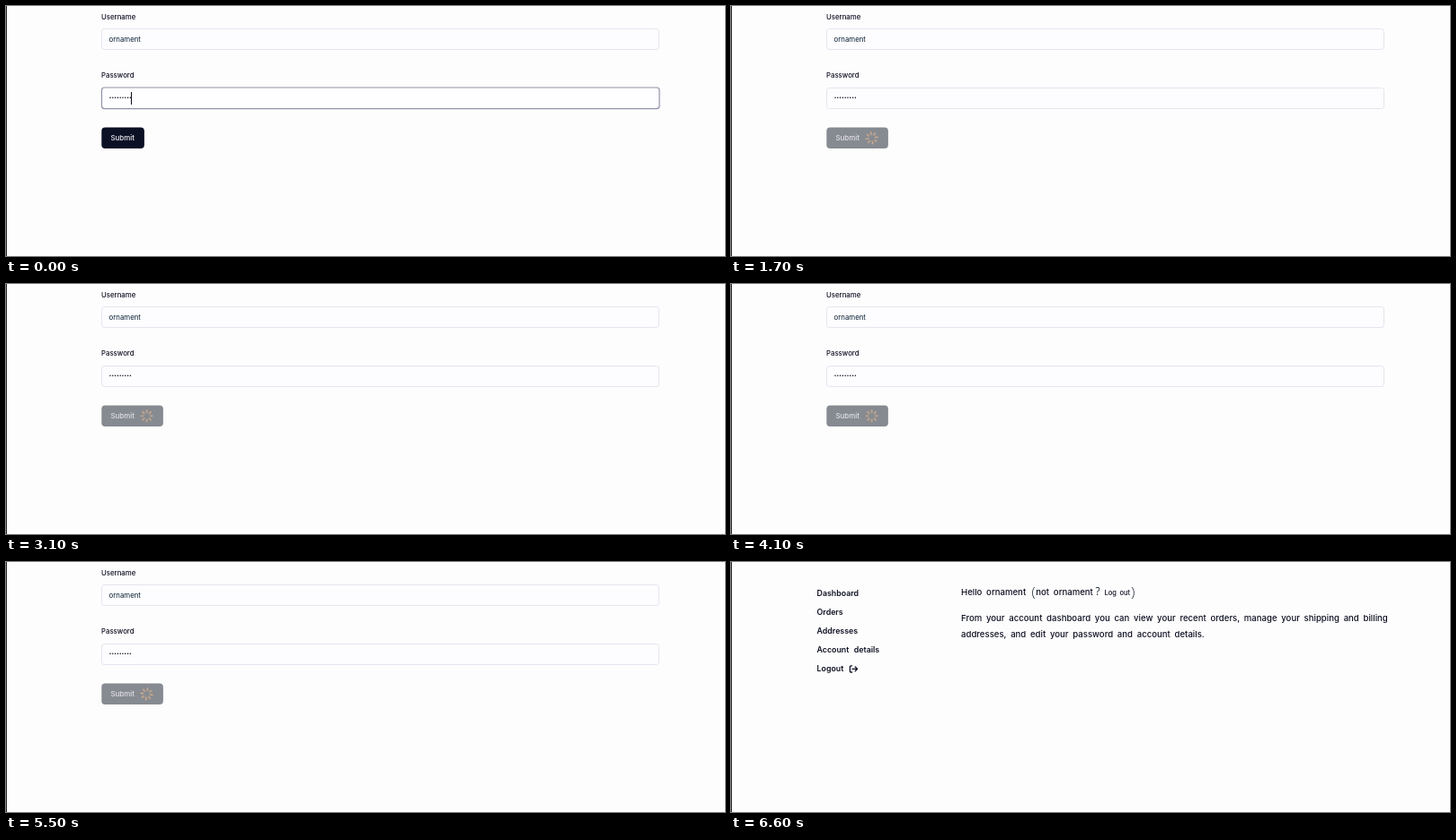
These frames come from a looping animation (800 by 279 pixels, 9000 ms). An HTML page:

```html
<!DOCTYPE html>
<html lang="en">
<head>
<meta charset="utf-8">
<title>Account login</title>
<style>
  html, body { margin: 0; width: 100%; height: 100%; overflow: hidden; background: #fefdfe; }
  svg { display: block; width: 800px; height: 279px; }
  text { font: 500 7.8px Inter, sans-serif; fill: #0d1020; }

  /* Scenes share one 9 s clock with hard cuts. */
  .idle, .caret, .busy, .account { animation: 9s step-end infinite; visibility: hidden; }
  .login { animation: login 9s step-end infinite; }
  .idle { animation-name: idle; }
  .caret { animation-name: caret; }
  .busy { animation-name: busy; }
  .account { animation-name: account; }
  @keyframes login { 0% { visibility: visible } 73.3333%, 100% { visibility: hidden } }
  @keyframes idle { 0% { visibility: visible } 6.6667%, 100% { visibility: hidden } }
  @keyframes caret { 0% { visibility: visible } 4.4444%, 100% { visibility: hidden } }
  @keyframes busy { 0% { visibility: hidden } 6.6667% { visibility: visible } 73.3333%, 100% { visibility: hidden } }
  @keyframes account { 0% { visibility: hidden } 73.3333%, 100% { visibility: visible } }

  .field { fill: #fdfdff; stroke: #e3e5ee; }
  .focus { fill: #fefdff; stroke: #8f93a8; stroke-width: 1.2; }
  .dots { stroke: #0d1020; stroke-width: 1.6; stroke-linecap: round; stroke-dasharray: 0 2.8; }
  .value { font-weight: 400; fill: #0b2033; }
  .button { fill: #0b1024; }
  .button + text { fill: #f1f2f6; font-size: 7.9px; }
  .busy .button { animation: dim 9s step-end infinite; }
  .busy .button + text { fill: #e2e3e6; }
  @keyframes dim { 0% { fill: #92949c } 14.4444%, 100% { fill: #868a91 } }

  .spinner { fill: none; stroke: #dfb48c; stroke-width: 2; stroke-linecap: round;
    animation: spin 1s steps(10) -.4s infinite; }
  @keyframes spin { to { transform: rotate(360deg) } }

  .nav text { font-weight: 600; font-size: 8.8px; word-spacing: 3.3px; }
  .copy text { font-size: 9.6px; word-spacing: 2.15px; }
  .copy .mark { font: 300 15px "Open Sans", sans-serif; fill: #1d2b33; }
  .copy .query { font: 400 12px "Open Sans", sans-serif; fill: #1d2b33; }
  .copy .link { font-size: 7.5px; word-spacing: 1.5px; }
  .icon { fill: none; stroke: #0d1020; stroke-width: 1.3; stroke-linecap: round; stroke-linejoin: round; }
</style>
</head>
<body>
<svg viewBox="0 0 800 279">
  <rect width="800" height="279" fill="#fefdfe"/>

  <g class="login">
    <text x="106" y="14.8">Username</text>
    <rect class="field" x="106.5" y="25.5" width="620" height="23" rx="3"/>
    <text class="value" x="114.6" y="39.7">ornament</text>
    <text x="106" y="80.4">Password</text>
    <rect class="field" x="106.5" y="91.5" width="620" height="23" rx="3"/>
    <rect class="focus idle" x="106.5" y="91" width="620.5" height="23.6" rx="3"/>
    <path class="dots" d="M116 102.3h22.5"/>
    <path class="caret" d="M139.5 96v14" stroke="#0d1020"/>
  </g>

  <g class="idle">
    <rect class="button" x="106.3" y="135.5" width="47.6" height="23.6" rx="4"/>
    <text x="116.5" y="149.8">Submit</text>
  </g>

  <g class="busy">
    <rect class="button" x="106.3" y="135.5" width="68.6" height="23.6" rx="4"/>
    <text x="116.5" y="149.8">Submit</text>
    <g transform="translate(156.6 147.3) scale(.65)">
      <path class="spinner" d="M0-10v4M4.2-4.2l2.9-2.9M6 0h4M4.2 4.2l2.9 2.9M0 6v4M-7.1 7.1l2.9-2.9M-10 0h4M-7.1-7.1l2.9 2.9"/>
    </g>
  </g>

  <g class="account">
    <g class="nav">
      <text x="95.6" y="38.2">Dashboard</text>
      <text x="95.6" y="59.3">Orders</text>
      <text x="95.6" y="80.3">Addresses</text>
      <text x="95.6" y="101.4">Account details</text>
      <text x="95.6" y="122.4">Logout</text>
      <path class="icon" d="M134.6 115.8h-1.2q-1 0-1 1v5.2q0 1 1 1h1.2M135 119.4h5.6M138.2 117l2.4 2.4-2.4 2.4"/>
    </g>
    <g class="copy">
      <text x="256" y="37">Hello ornament</text>
      <text class="mark" x="334.6" y="39">(</text>
      <text x="339.3" y="37">not ornament</text>
      <text class="query" x="405.5" y="37">?</text>
      <text class="link" x="415.5" y="37">Log out</text>
      <text class="mark" x="445.2" y="39">)</text>
      <text x="256" y="65.8">From your account dashboard you can view your recent orders, manage your shipping and billing</text>
      <text x="256" y="84.3">addresses, and edit your password and account details.</text>
    </g>
  </g>

  <rect width="1" height="279" fill="#25262b"/>
</svg>
</body>
</html>
```
